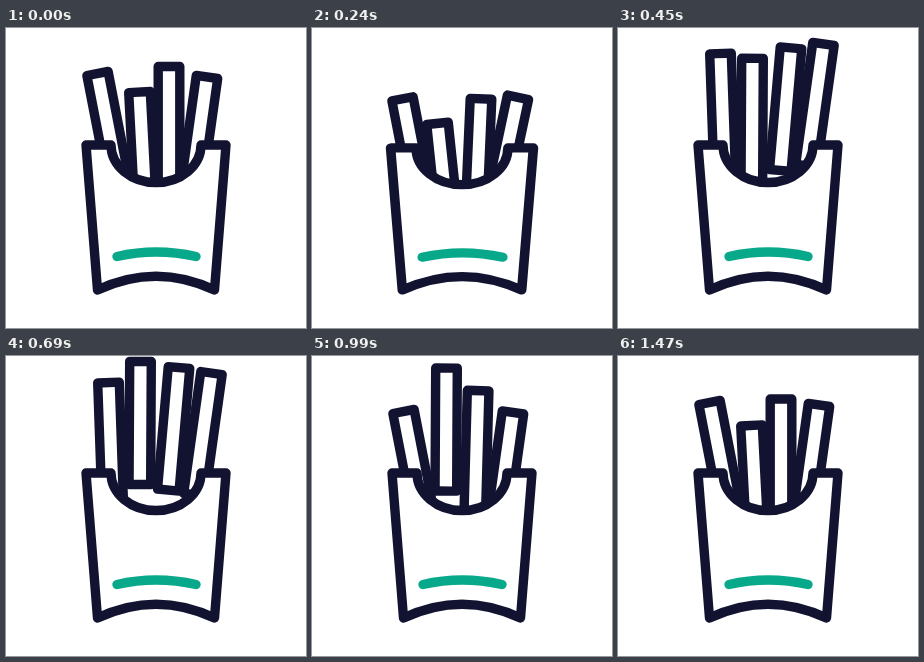
An HTML page that plays this animation: 300x300 px, repeating every 1500 ms.

```html
<!DOCTYPE html>
<html lang="en">
<head>
<meta charset="utf-8">
<title>French fries</title>
<style>
  html, body { margin: 0; height: 100%; overflow: hidden; background: #fff; }
  svg { display: block; width: 100%; height: 100%; }
</style>
</head>
<body>
<svg viewBox="0 0 300 300" fill="#fff" stroke="#121331" stroke-width="9.4" stroke-linecap="round" stroke-linejoin="round">
  <g id="fries"></g>
  <g id="box">
    <path d="M80 117H105A45 37.5 0 0 0 195 117H220L208.5 262Q150 234.5 91.5 262Z"/>
    <path d="M111 228.5Q150 219.5 190 228.5" fill="none" stroke="#08a88a"/>
  </g>
</svg>
<script>
const LOOP = 1500, DIP = 150, RISE = 240, UP = 450;

// Back to front. x and tilt: at rest, dipped, raised. start: y at 0, DIP, RISE and UP.
// then: later [time, y]. fall: when the raised pose turns back to rest.
const fryData = [
  { x: [91.5, 90.5, 102.5], tilt: [-11, -11, -2], start: [45.5, 82, 71, 25.5],
    then: [[550, 23.5], [690, 26.5], [940, 57.5], [990, 55.5], [1230, 46.5]], fall: [690, 990] },
  { x: [201, 206, 205.5], tilt: [8, 12, 8], start: [49, 81, 69.5, 16],
    then: [[530, 13], [690, 17], [940, 58.5], [990, 56.5], [1230, 49]], fall: [690, 990] },
  { x: [133.5, 125.5, 134.5], tilt: [-3, -6, 0.3], start: [64, 103, 95.5, 30.5],
    then: [[690, 5.5], [780, 4.7], [990, 12], [1080, 26], [1230, 69.5], [1290, 76], [1410, 69.5]], fall: [990, 1230] },
  { x: [163, 169, 173], tilt: [0, 2.5, 5], start: [38.5, 83, 71, 20],
    then: [[620, 10], [690, 11.5], [990, 34.5], [1110, 52], [1230, 45], [1330, 43]], fall: [690, 1170] }
];
const squashKeys = [[0, 0], [120, 1], [RISE, 0.22], [300, 0], [LOOP, 0]];

// Smooth curve through [time, value] keys that never overshoots them.
function sample(keys, t) {
  const slope = i => keys[i + 1] ? (keys[i + 1][1] - keys[i][1]) / (keys[i + 1][0] - keys[i][0]) : 0;
  const tangent = i => {
    const a = i ? slope(i - 1) : 0, b = slope(i);
    return a * b > 0 ? 2 * a * b / (a + b) : 0;
  };
  let i = 0;
  while (i < keys.length - 2 && t >= keys[i + 1][0]) i++;
  const d = keys[i + 1][0] - keys[i][0], u = (t - keys[i][0]) / d, v = 1 - u;
  return keys[i][1] * v * v * (1 + 2 * u) + keys[i + 1][1] * u * u * (3 - 2 * u)
    + d * u * v * (tangent(i) * v - tangent(i + 1) * u);
}

function poseKeys([rest, dip, raised], [from, to]) {
  return [[0, rest], [DIP, dip], [RISE, dip], [UP, raised], [from, raised], [to, rest], [LOOP, rest]];
}

const box = document.getElementById("box");
const fries = fryData.map(({ x, tilt, start, then, fall }) => {
  const shape = document.createElementNS("http://www.w3.org/2000/svg", "path");
  shape.setAttribute("d", "M-10.8 0H10.8V123H-10.8Z");
  document.getElementById("fries").append(shape);
  const y = [0, DIP, RISE, UP].map((time, i) => [time, start[i]]).concat(then);
  y.push([LOOP, y[y.length - 1][1]]);
  return { shape, x: poseKeys(x, fall), y, tilt: poseKeys(tilt, fall) };
});

function draw(now) {
  const t = now % LOOP;
  for (const { shape, x, y, tilt } of fries) {
    shape.setAttribute("transform",
      `translate(${sample(x, t)} ${sample(y, t)}) rotate(${sample(tilt, t)})`);
  }
  const squash = 0.095 * sample(squashKeys, t);
  box.setAttribute("transform",
    `translate(150 262) scale(${1 + squash} ${1 - squash}) translate(-150 -262)`);
}

const begin = performance.now();
function tick() {
  draw(performance.now() - begin);
  requestAnimationFrame(tick);
}
tick();
</script>
</body>
</html>
```
